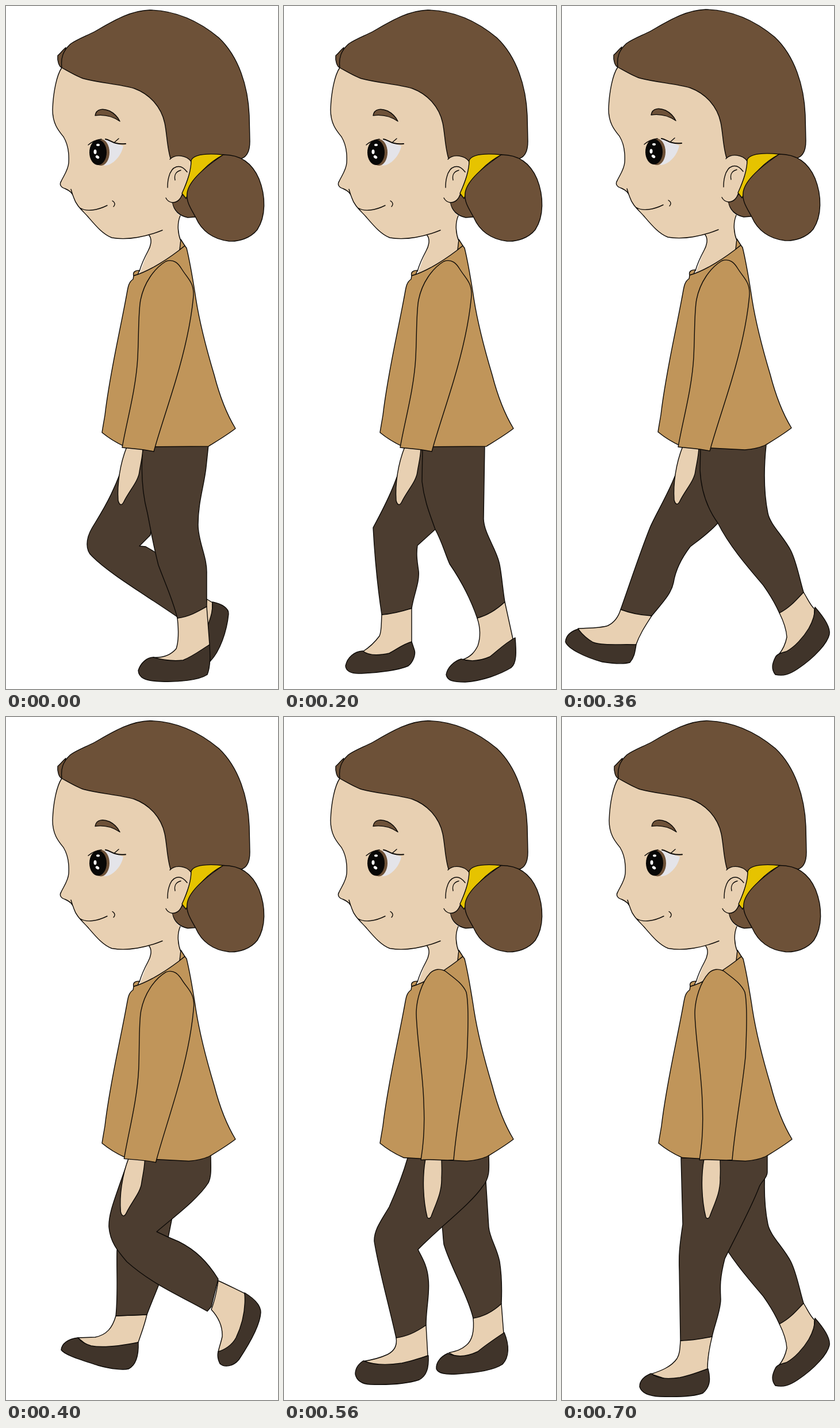
Animation, 473 px wide and 1185 px high, one loop 0.8 s. Source, as an HTML page:

```html
<!DOCTYPE html>
<html lang="en">
<head>
<meta charset="utf-8">
<title>Walk cycle</title>
<style>
html, body { margin: 0; width: 100%; height: 100%; overflow: hidden; background: #fff; }
svg { display: block; width: 100%; height: 100%; }
path { stroke: #0d0a07; stroke-width: 1.4; stroke-linejoin: round; stroke-linecap: round; fill: none; }
.hair { fill: #6d5138; }
.skin { fill: #e8d0b2; }
.shirt { fill: #c0955a; }
.pants { fill: #4c3d30; }
.shoe { fill: #40342a; }
.band { fill: #e6c300; }
.bare { stroke: none; }
</style>
</head>
<body>
<svg viewBox="0 0 473 1185">
  <!-- Legs; data-on lists the poses that show a group -->
  <g data-on="0">
    <path class="skin" d="M349 1029L359 1035L358 1075L345 1080Z"/>
    <path class="shoe" d="M359 1034C375 1037 388 1045 387 1055C384 1085 372 1120 355 1137L351 1075C356 1060 360 1050 359 1034Z"/>
    <path class="pants" d="M214 765C190 845 165 880 150 905C138 925 138 945 150 955C180 985 240 1020 298 1060L310 1000L260 948L243 938L232 937L251 918L270 765Z"/>
    <path class="skin" d="M298 1062C300 1080 301 1100 296 1115C285 1128 270 1131 256 1130L300 1160L354 1108L349 1042Z"/>
    <path class="shoe" d="M256 1130C245 1130 234 1140 230 1153C231 1165 240 1171 270 1172C300 1173 335 1170 350 1160C356 1145 355 1125 354 1108C338 1118 325 1128 308 1135C290 1137 270 1134 256 1130Z"/>
    <path class="pants" d="M238 765C234 810 238 850 246 880C252 910 256 935 265 970C278 1005 290 1030 298 1062C318 1060 335 1050 349 1042L349 985C350 955 334 930 334 900C334 860 345 830 348 800L352 762Z"/>
  </g>
  <g data-on="1">
    <path class="skin" d="M170 1056C169 1070 170 1085 166 1093C155 1108 145 1115 137 1120L160 1140L222 1106L222 1045Z"/>
    <path class="shoe" d="M137 1119C122 1120 110 1130 107 1145C108 1155 117 1159 135 1158C165 1157 200 1152 216 1145C225 1138 229 1125 227 1118L222 1103C205 1108 195 1117 183 1123C165 1127 148 1128 137 1119Z"/>
    <path class="pants" d="M214 765C195 825 185 850 155 905C158 960 163 1010 170 1056C188 1055 206 1050 222 1045C226 1020 236 1000 234 980C231 960 230 950 232 936L263 908L270 765Z"/>
    <path class="skin" d="M336 1062C342 1080 342 1095 337 1110C332 1120 325 1130 308 1135L340 1150L398 1098L384 1034Z"/>
    <path class="shoe" d="M308 1133C295 1137 284 1148 282 1160C284 1171 295 1173 315 1173C345 1171 375 1160 395 1148C405 1140 404 1120 402 1096C385 1105 372 1118 358 1129C340 1137 325 1138 308 1133Z"/>
    <path class="pants" d="M241 765L240 825C244 860 255 885 263 908C275 930 280 950 288 968C310 1000 325 1030 336 1062C355 1057 370 1047 384 1034C380 1010 378 980 374 965C368 940 348 915 347 890L349 762Z"/>
  </g>
  <g data-on="25">
    <path class="skin" d="M102 1047C98 1060 90 1070 80 1075C65 1080 45 1079 28 1080L45 1110L128 1110C135 1090 145 1075 156 1058Z"/>
    <path class="shoe" d="M28 1081C15 1085 7 1092 6 1103C10 1115 40 1130 70 1138C90 1141 108 1142 118 1139C126 1130 127 1120 129 1108C100 1107 70 1110 54 1104C43 1098 35 1090 28 1081Z"/>
  </g>
  <path data-on="2" class="pants" d="M214 765C196 830 167 873 153 905C135 950 117 1005 102 1047C120 1054 138 1057 156 1058C175 1035 190 1020 194 1000C198 975 210 955 223 938C240 925 255 915 271 897L270 765Z"/>
  <g data-on="256">
    <path class="skin" d="M378 1053C385 1067 390 1080 391 1095C388 1110 383 1118 377 1125L390 1125L415 1110L438 1080L439 1046C432 1040 428 1030 420 1017Z"/>
    <path class="shoe" d="M440 1043C455 1060 467 1078 465 1090C462 1105 440 1130 410 1150C395 1160 385 1163 371 1160C363 1150 366 1140 371 1130C374 1124 382 1122 390 1120C405 1112 420 1095 429 1080C436 1068 440 1055 440 1043Z"/>
    <path class="pants" d="M241 765L240 805C242 845 255 875 271 897C290 935 320 970 350 1005C362 1022 370 1035 378 1053C395 1045 408 1030 420 1017C412 990 408 965 398 945C385 920 362 900 358 880C352 850 350 810 355 762Z"/>
  </g>
  <path data-on="5" class="pants" d="M208 765C198 810 180 855 153 905C135 950 117 1005 102 1047C120 1054 138 1057 156 1058C175 1035 190 1020 194 1000C198 975 210 955 223 938C250 915 320 855 345 812C352 800 357 795 357 785L357 760Z"/>
  <g data-on="3">
    <path class="skin" d="M191 1039C185 1060 175 1072 155 1076L125 1077L160 1105L230 1085C235 1070 241 1055 245 1037Z"/>
    <path class="shoe" d="M125 1077C108 1079 97 1087 96 1098C102 1107 130 1115 160 1125C185 1132 205 1133 213 1131C225 1125 231 1110 230 1085C200 1091 170 1095 148 1091C138 1088 130 1083 125 1077Z"/>
    <path class="pants" d="M193 925C192 960 195 1000 191 1039L245 1037C252 1018 260 1000 266 984L289 868L230 850Z"/>
    <path class="skin" d="M369 978C366 1000 362 1015 357 1028C368 1040 377 1055 376 1075C374 1085 370 1095 369 1102L385 1105L412 1075L420 1030L415 1000C400 993 385 985 369 978Z"/>
    <path class="shoe" d="M415 999C430 1008 443 1020 443 1033C442 1055 425 1085 405 1115C395 1127 380 1129 372 1122C367 1112 368 1105 369 1101C380 1098 393 1090 400 1077C412 1052 417 1025 415 999Z"/>
    <path class="pants" d="M214 764C190 835 178 860 179 885C181 910 193 925 210 945C255 985 305 1005 350 1031L357 1023L369 975C350 945 330 925 300 910C285 904 272 898 262 893C295 865 335 835 352 808C358 795 356 780 356 760Z"/>
  </g>
  <g data-on="4">
    <path class="skin" d="M329 1043C331 1065 327 1082 317 1090C308 1098 300 1100 287 1103L320 1120L382 1070L378 1018Z"/>
    <path class="shoe" d="M285 1104C272 1110 264 1120 265 1131C268 1139 280 1141 300 1140C335 1138 365 1133 380 1123C392 1110 392 1090 383 1068C365 1080 350 1090 337 1101C318 1110 300 1111 285 1104Z"/>
    <path class="pants" d="M270 870C277 880 275 890 278 915C290 955 318 1000 329 1043C350 1040 365 1030 378 1018C379 995 379 970 375 945C370 920 358 905 356 885L351 805L320 800Z"/>
    <path class="skin" d="M195 1077C197 1090 192 1100 180 1106C165 1113 150 1116 137 1118L180 1135L250 1108L247 1055Z"/>
    <path class="shoe" d="M138 1117C130 1122 124 1130 124 1140C126 1150 133 1157 150 1158C180 1159 210 1158 235 1150C248 1143 252 1130 251 1108C235 1113 220 1118 205 1121C185 1124 160 1126 138 1117Z"/>
    <path class="pants" d="M215 765C205 800 192 830 183 850C170 872 156 890 157 910C165 960 180 1010 195 1077C215 1075 233 1065 247 1055C247 1025 254 1000 251 975C249 950 238 935 233 924C265 890 325 845 345 815C358 800 357 785 356 760Z"/>
  </g>
  <g data-on="6">
    <path class="skin" d="M206 1082C205 1095 205 1105 200 1113C190 1128 170 1135 155 1140L200 1155L253 1131C253 1110 256 1095 261 1075Z"/>
    <path class="shoe" d="M155 1139C145 1143 135 1150 135 1162C138 1172 150 1178 170 1179C200 1180 230 1179 245 1173C257 1163 259 1150 254 1131C235 1137 225 1142 205 1146C185 1149 165 1148 155 1139Z"/>
    <path class="pants" d="M207 765L210 880C204 920 203 935 204 960L206 1082C225 1082 242 1079 261 1075C265 1055 276 1030 276 1010C275 990 274 975 283 940C300 905 330 850 343 815C347 805 357 800 357 790L357 760Z"/>
  </g>

  <g id="upper">
    <!-- Head -->
    <path class="hair" d="M289 341C292 355 302 364 316 367L329 366L318 320Z"/>
    <path class="skin bare" d="M97 107C88 120 82 150 81 180C81 205 92 217 100 227C108 240 110 255 109 272C108 285 100 295 96 304C92 310 96 315 103 317C112 321 116 325 118 333C122 346 132 354 142 365C155 380 168 396 184 402C200 407 225 403 249 398C255 406 251 418 247 425L230 470L306 422C299 395 297 378 303 364C295 358 290 350 289 341L300 270L270 130Z"/>
    <path d="M97 107C88 120 82 150 81 180C81 205 92 217 100 227C108 240 110 255 109 272C108 285 100 295 96 304C92 310 96 315 103 317C112 321 116 325 118 333C122 346 132 354 142 365C155 380 168 396 184 402C212 407 245 400 272 389M249 398C255 406 251 418 247 425C240 438 235 450 232 460M303 364C297 378 299 395 304 408M113 318L116 328M128 350C140 358 160 354 176 346M185 338C190 341 190 345 187 348"/>
    <path class="hair" d="M97 107C92 105 89 95 90 86C95 82 98 77 104 72Z"/>
    <path class="hair" d="M97 107C95 90 99 78 112 66C125 57 140 52 155 44C185 27 215 8 250 7C300 8 340 30 370 55C405 88 421 140 423 190L424 235C424 250 420 262 408 265L322 270L286 264C280 245 280 222 276 203C270 175 250 153 223 143C195 135 165 134 135 126C125 123 115 117 97 107Z"/>
    <path class="skin bare" d="M322 270C314 259 295 256 285 266L280 315C276 325 279 335 289 341C298 341 304 335 307 325C312 313 316 300 322 285Z"/>
    <path d="M285 266C295 256 314 259 322 270L322 285C316 300 312 313 307 325C304 335 298 341 289 341C283 340 280 337 278 333M315 288C303 272 288 277 283 297C281 304 281 310 281 315M304 285C296 287 292 293 294 302"/>
    <path class="band" d="M322 268C326 258 345 255 378 258C355 270 330 290 313 334L306 325C314 308 322 288 322 268Z"/>
    <path class="hair" d="M378 258C400 258 425 265 440 300C452 330 452 365 437 388C425 403 405 409 388 408C360 405 340 390 330 367C322 352 313 340 315 325C317 305 345 280 378 258Z"/>
    <path class="hair" d="M155 190C157 177 170 178 180 182C190 187 195 194 198 200C185 191 170 188 155 190Z"/>
    <path class="bare" style="fill:#e4e4e9" d="M150 238C160 230 178 230 190 238L204 243C200 262 185 276 172 277L150 265Z"/>
    <ellipse cx="165" cy="254" rx="15" ry="23" fill="#6d5138"/>
    <ellipse cx="160" cy="254" rx="15" ry="22" fill="#080706"/>
    <g fill="#fff">
      <ellipse cx="160" cy="241" rx="3" ry="2"/>
      <ellipse cx="155" cy="253" rx="2.5" ry="4"/>
      <ellipse cx="159" cy="262" rx="3.5" ry="2.5" transform="rotate(35 159 262)"/>
    </g>
    <path d="M143 241C150 235 158 232 166 231M188 237L196 230"/>
    <path style="stroke-width:2" d="M173 231C182 232 186 241 208 239"/>

    <!-- Shirt -->
    <path class="shirt" d="M222 468C220 462 225 458 232 459L229 466Z"/>
    <path class="shirt" d="M304 405L311 416L302 423Z"/>
    <path class="shirt" d="M221 474L222 468C250 460 285 437 311 416L314 420C319 440 325 475 329 500C336 550 350 600 362 640C375 690 388 715 399 733C385 744 368 754 352 764L208 765C192 758 178 749 167 740C168 733 170 722 172 710C180 640 197 570 209 505C212 490 212 480 221 474Z"/>
    <g data-on="23456">
      <path class="shirt bare" d="M208 762L354 762L357 762C345 768 330 770 318 771L260 768L208 765Z"/>
      <path d="M208 765L260 768L318 771C330 770 345 768 357 761"/>
    </g>

    <!-- Arms -->
    <g id="forwardArm" data-on="0123">
      <path class="skin" d="M210 765C198 795 193 830 195 858C197 866 201 868 205 860C215 840 230 825 232 808C234 795 237 785 238 768Z"/>
      <path class="shirt" d="M202 766C210 720 226 665 229 610C231 570 230 530 234 510C240 480 258 455 278 443C292 438 300 447 306 457C316 473 327 480 326 502C322 550 310 600 295 650C280 700 266 740 257 773C240 769 220 768 202 766Z"/>
    </g>
    <g data-on="46">
      <path class="skin" d="M246 767C240 800 242 840 249 868C251 872 254 871 256 867C264 845 275 825 274 800C275 785 274 778 274 767Z"/>
      <path class="shirt" d="M238 769C243 740 245 710 243 670C242 620 231 560 230 515C230 490 240 460 254 445C262 437 272 437 280 441C295 453 310 462 317 478C322 500 320 550 318 590C312 650 300 710 295 769C280 771 258 767 238 769Z"/>
    </g>
    <g data-on="5">
      <path class="skin" d="M284 759C284 790 288 825 300 855C304 861 308 860 309 853C310 835 318 810 317 795C314 780 314 770 314 755Z"/>
      <path class="shirt" d="M276 763C275 735 274 690 268 650C260 600 240 550 234 510C233 480 242 450 256 434C265 427 275 430 284 436C300 445 312 455 318 467C330 500 331 540 331 600L332 745C332 752 328 754 325 755C308 758 290 760 276 763Z"/>
    </g>
  </g>
</svg>
<script>
const LOOP = 800, STEP = 100;
const parts = document.querySelectorAll('[data-on]');
const upper = document.getElementById('upper');
const forwardArm = document.getElementById('forwardArm');
const lift = [0, 0, -1, -.5, -.5, -1, -.5];
let shown = -1;

function draw() {
  // The first pose is held for two steps, all others for one
  const pose = Math.max(0, Math.floor(performance.now() % LOOP / STEP) - 1);
  if (pose !== shown) {
    shown = pose;
    for (const part of parts) part.style.display = part.dataset.on.includes(pose) ? '' : 'none';
    upper.setAttribute('transform', `translate(${pose === 6 ? 1 : 0} ${lift[pose]})`);
    forwardArm.setAttribute('transform', `rotate(${pose === 3 ? -.6 : 0} 287 443)`);
  }
  requestAnimationFrame(draw);
}
draw();
</script>
</body>
</html>
```
